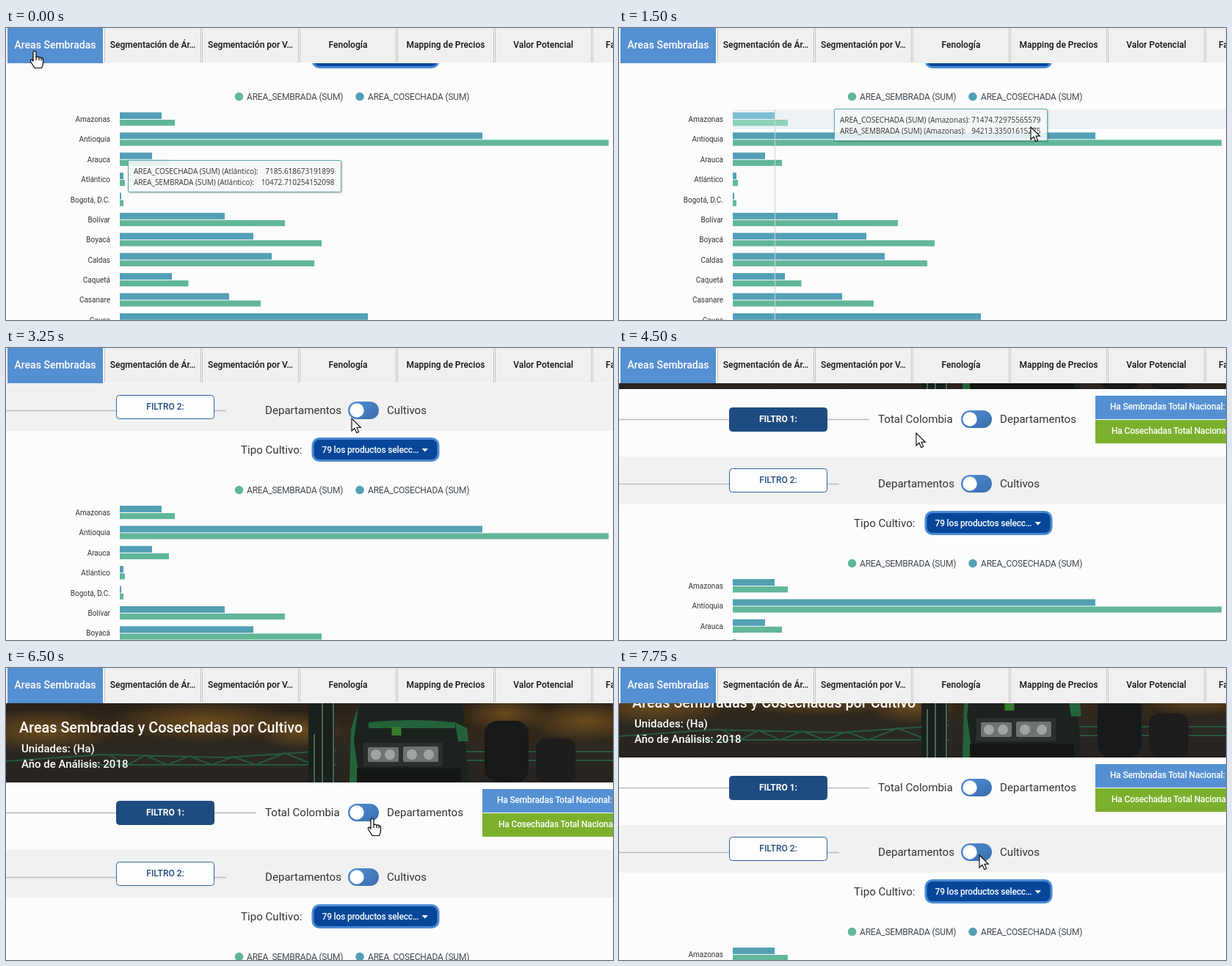
Write an HTML page that moves like this. It is 827 px wide and 398 px high and loops after 8 s.

```html
<!DOCTYPE html>
<html lang="es">
<head>
<meta charset="utf-8">
<style>
html, body { margin: 0; width: 100%; height: 100%; overflow: hidden; background: #fcfcfc }
svg { display: block; font-family: Roboto, sans-serif }
.m { font-weight: 500 }
.b { font-weight: 700 }
.tight { letter-spacing: -.18px }
.tip { font-family: "Open Sans", sans-serif; font-size: 10px; fill: #333 }
</style>
</head>
<body>
<svg id="stage" width="827" height="398" viewBox="0 0 827 398">
  <defs>
    <linearGradient id="sky" x2="0" y2="1">
      <stop offset="0" stop-color="#2a2118"/><stop offset=".35" stop-color="#33281a"/>
      <stop offset=".6" stop-color="#2a2822"/><stop offset="1" stop-color="#29231f"/>
    </linearGradient>
    <radialGradient id="glow"><stop stop-color="#94661f" stop-opacity=".6"/><stop offset="1" stop-color="#94661f" stop-opacity="0"/></radialGradient>
    <linearGradient id="pill" x2="1" y2="1"><stop stop-color="#4f8fd6"/><stop offset="1" stop-color="#3a6cab"/></linearGradient>
    <filter id="shade" x="-5%" y="-20%" width="110%" height="150%"><feDropShadow dx="1" dy="1" stdDeviation="1" flood-opacity=".25"/></filter>
  </defs>
  <g id="page"></g>
  <g id="tabs"></g>
  <path id="arrow" d="M0 0V17L4 13.3 6.7 19.6 9.6 18.4 7 12.3H12.3Z" fill="#fff" stroke="#000" stroke-width="1.1"/>
  <path id="hand" d="M-2 2.5Q0-.2 2 2.5V10Q4 8 6 10.4Q8 9 9 11.3Q11.4 10.4 11.5 13V18Q11.4 21 9.5 24.5H0L-5.3 16Q-6.4 13 -4 13L-2 15ZM2 10V14M6 10.5V14M9 11.5V14.5" fill="#fff" stroke="#000" stroke-width="1.2" stroke-linejoin="round"/>
</svg>
<script>
const $ = id => document.getElementById(id);
const rect = (x, y, w, h, fill, more = '') =>
  `<rect x="${x}" y="${y}" width="${w}" height="${h}" fill="${fill}" ${more}/>`;
const text = (x, y, size, fill, str, more = '') =>
  `<text x="${x}" y="${y}" font-size="${size}" fill="${fill}" ${more}>${str}</text>`;
const circle = (x, y, r, fill) => `<circle cx="${x}" cy="${y}" r="${r}" fill="${fill}"/>`;
const path = (d, stroke, width = 1, fill = 'none') =>
  `<path d="${d}" stroke="${stroke}" stroke-width="${width}" fill="${fill}"/>`;
const MID = 'text-anchor="middle" class="m"', END = 'text-anchor="end"', MED = 'class="m"';
const TIGHT = 'class="tight"', MED_TIGHT = 'class="m tight"';
const BLUE = '#53a0b5', GREEN = '#62b799';

function banner() {
  let s = rect(0, 48, 827, 108, 'url(#sky)');
  for (const [x, y, rx, ry] of [[50, 85, 100, 30], [270, 72, 130, 28], [400, 85, 60, 26], [680, 62, 60, 24], [790, 72, 80, 28]])
    s += `<ellipse cx="${x}" cy="${y}" rx="${rx}" ry="${ry}" fill="url(#glow)"/>`;
  // spray boom
  s += path('M0 127L130 118 300 122 450 112M100 132H450M140 118L165 132 190 119 220 132 250 120 280 132 310 121 340 132 380 116 420 132M625 114H827M625 126H827', '#28583c', 2);
  // ladder, cab, grille and lamps
  s += rect(412, 48, 36, 108, '#18211c') + path('M420 90V156M431 48V156M446 48V156', '#4d6657', 2);
  s += path('M478 48H622L630 156H470L472 88Z', 'none', 0, '#1c231f');
  s += path('M480 50L474 100 482 156H468L470 84ZM494 74Q550 68 612 74V82H494ZM612 74L628 82 630 100H616Z', 'none', 0, '#24623a');
  s += rect(487, 102, 108, 32, '#2b2f2d') + rect(493, 108, 42, 20, '#6f7371', 'rx="2"') + rect(541, 107, 48, 21, '#6f7371', 'rx="2"');
  s += [504, 523, 553, 576].map(x => circle(x, 118, 7, '#a0a4a2')).join('');
  s += rect(478, 137, 142, 19, '#141615');
  s += rect(652, 72, 60, 84, '#17191a', 'rx="18"') + rect(722, 96, 54, 60, '#1e1d1b', 'rx="14"');
  s += rect(525.5, 80, 13, 12, '#367c2b');
  return s + text(18, 88, 19.8, '#fff', 'Areas Sembradas y Cosechadas por Cultivo', MED) +
    text(21, 115, 15, '#fff', 'Unidades: (Ha)', MED) + text(21, 136, 15, '#fff', 'Año de Análisis: 2018', MED);
}

function filterRow(y, end, boxY, label, solid, left, right) {
  return path(`M0 ${y + .5}H${end}`, '#b9b9b9', 1.3) +
    rect(150.5, boxY + .5, 133, 32, solid ? '#1f4c80' : '#fdfdfd', `rx="4" stroke="${solid ? '#1f4c80' : '#2f65a0'}"`) +
    text(217, boxY + 20, 12, solid ? '#fff' : '#1f4c80', label, `text-anchor="middle" class="${solid ? 'b' : 'm'}"`) +
    text(353, y + 5, 15.1, '#333', left) + text(519, y + 5, 15.1, '#333', right) +
    rect(466, y - 12, 42, 24, 'url(#pill)', 'rx="12"') + circle(478, y, 9.7, '#fff');
}

const rows = [
  ['Amazonas', 212, 230], ['Antioquia', 649, 821], ['Arauca', 199, 222], ['Atlántico', 160, 162],
  ['Bogotá, D.C.', 157, 160], ['Bolívar', 298, 380], ['Boyacá', 337, 430], ['Caldas', 362, 420],
  ['Caquetá', 226, 248.5], ['Casanare', 304, 347], ['Cauca', 493, 560]
];

function chart() {
  let s = circle(317.5, 393.5, 5.8, GREEN) + text(328, 398, 12, '#404a52', 'AREA_SEMBRADA (SUM)', TIGHT) +
    circle(482, 393.5, 5.8, BLUE) + text(493, 398, 12, '#404a52', 'AREA_COSECHADA (SUM)', TIGHT);
  s += `<g id="band">${rect(155, 411, 672, 27, '#edf2f6')}</g>`;
  rows.forEach(([name, blue, green], i) => {
    const y = 415 + 27.38 * i;
    s += text(142, y + 13, 10, '#333', name, END) +
      rect(155, y, blue - 155, 9, BLUE) + rect(155, y + 10, green - 155, 8.2, GREEN);
  });
  return s + `<g id="hover">${rect(155, 415, 57, 9, '#80bdd0')}${rect(155, 425, 75, 8.2, '#8dd2b8')}${path('M212.5 411V720', '#cfd3d5')}</g>`;
}

$('page').innerHTML = rect(0, 48, 827, 700, '#fcfcfc') + banner() + rect(0, 248, 827, 65, '#f1f1f1') +
  filterRow(197, 341, 181, 'FILTRO 1:', true, 'Total Colombia', 'Departamentos') +
  filterRow(285, 300, 264, 'FILTRO 2:', false, 'Departamentos', 'Cultivos') +
  rect(649, 165, 178, 32, '#5590d2') + text(669, 184, 12, '#fff', 'Ha Sembradas Total Nacional:', MED_TIGHT) +
  rect(649, 198, 178, 32, '#7ab02c') + text(671, 217, 12, '#fff', 'Ha Cosechadas Total Nacional:', MED_TIGHT) +
  text(320, 344, 15.1, '#333', 'Tipo Cultivo:') +
  rect(418, 323.5, 171, 30, '#06479a', 'rx="9" stroke="#4b8ad4" stroke-width="3"') +
  text(430.5, 343, 12, '#fff', '79 los productos selecc…', MED_TIGHT) +
  path('M566.5 337H575L570.8 341.5Z', 'none', 0, '#fff') + chart() + '<g id="tip"></g>';

let tabs = rect(0, 0, 827, 48, '#fafafa') + rect(2, 0, 130, 48, '#5590d2') +
  text(67, 28, 14, '#fff', 'Areas Sembradas', MID);
['Segmentación de Ár…', 'Segmentación por V…', 'Fenología', 'Mapping de Precios', 'Valor Potencial', ''].forEach((name, i) => {
  const x = 134 + 133 * i;
  tabs += rect(x, 0, 131, 47, '#f0f0f0') + path(`M${x + .5} 0V47M${x + 131.5} 0V47`, '#c3c3c3') +
    text(x + 66, 27, 12, '#111', name, MID);
});
$('tabs').innerHTML = tabs + text(817, 27, 12, '#111', 'Fa', MED);

function tooltip(name, cosecha, siembra) {
  return rect(.5, .5, 290, 43, '#f9fbfb', 'fill-opacity=".87" stroke="#62a5ad" rx="1.5" filter="url(#shade)"') +
    [['COSECHADA', cosecha], ['SEMBRADA', siembra]].map(([kind, value], i) => {
      const y = 18.5 + 15 * i;
      return text(8, y, 10, '#333', `AREA_${kind} (SUM) (${name}):`, 'class="tip"') +
        text(281.5, y, 10, '#333', value, 'class="tip" ' + END);
    }).join('');
}
const tips = {
  A: tooltip('Atlántico', '7185.618673191899', '10472.710254152098'),
  Z: tooltip('Amazonas', '71474.72975565579', '94213.33501615275')
};

// time, scroll, pointer x, y, pointer shape, [tooltip, x, page y, opacity]
const steps = [
  [0, 300, 39, 30, 'hand', ['A', 166, 480, 1]],
  [250, 300, 40, 23, 'hand', ['A', 166, 480, .5]],
  [500, 300, 40, 16, 'hand'],
  [1250, 300, 420, 122, 'arrow', ['Z', 240, 425, 1]],
  [1500, 300, 561, 135, 'arrow', ['Z', 293, 410, 1]],
  [1750, 240, 568, 136, 'arrow', ['Z', 230, 400, 1]],
  [2000, 200, 569, 135, 'hand', ['Z', 218, 397, 1]],
  [2250, 200, 569, 135, 'hand'],
  [2500, 200, 562, 130, 'hand'],
  [2750, 200, 530, 112, 'arrow'],
  [3000, 200, 490, 100, 'arrow'],
  [3250, 200, 471, 96, 'arrow'],
  [3500, 150, 452, 102, 'arrow'],
  [3750, 100, 430, 108, 'arrow'],
  [4000, 100, 415, 113, 'arrow'],
  [4250, 100, 407, 116, 'arrow'],
  [4500, 100, 405, 116, 'arrow'],
  [4750, 0, 415, 127, 'arrow'],
  [5000, 0, 445, 158, 'arrow'],
  [5250, 0, 482, 198, 'hand'],
  [5500, 0, 499, 215, 'hand'],
  [6000, 0, 511, 210, 'hand'],
  [6250, 0, 505, 207, 'hand'],
  [6500, 0, 499, 204, 'hand'],
  [6750, 0, 492, 196, 'hand'],
  [7000, 0, 487, 200, 'hand'],
  [7500, 0, 489, 235, 'arrow'],
  [7750, 34, 491, 255, 'arrow']
];

let last;
function frame(now) {
  const step = steps.findLast(s => s[0] <= now % 8000) || steps[0];
  if (step !== last) {
    last = step;
    const [time, scroll, x, y, shape, tip] = step;
    $('page').setAttribute('transform', `translate(0 ${-scroll})`);
    for (const id of ['arrow', 'hand']) {
      $(id).setAttribute('transform', `translate(${x} ${y})`);
      $(id).style.display = id === shape ? '' : 'none';
    }
    const hovered = time === 1250 || time === 1500;
    $('band').style.display = $('hover').style.display = hovered ? '' : 'none';
    $('tip').innerHTML = tip ? tips[tip[0]] : '';
    if (tip) {
      $('tip').setAttribute('transform', `translate(${tip[1]} ${tip[2]})`);
      $('tip').setAttribute('opacity', tip[3]);
    }
  }
  requestAnimationFrame(frame);
}
frame(0);
</script>
</body>
</html>
```
